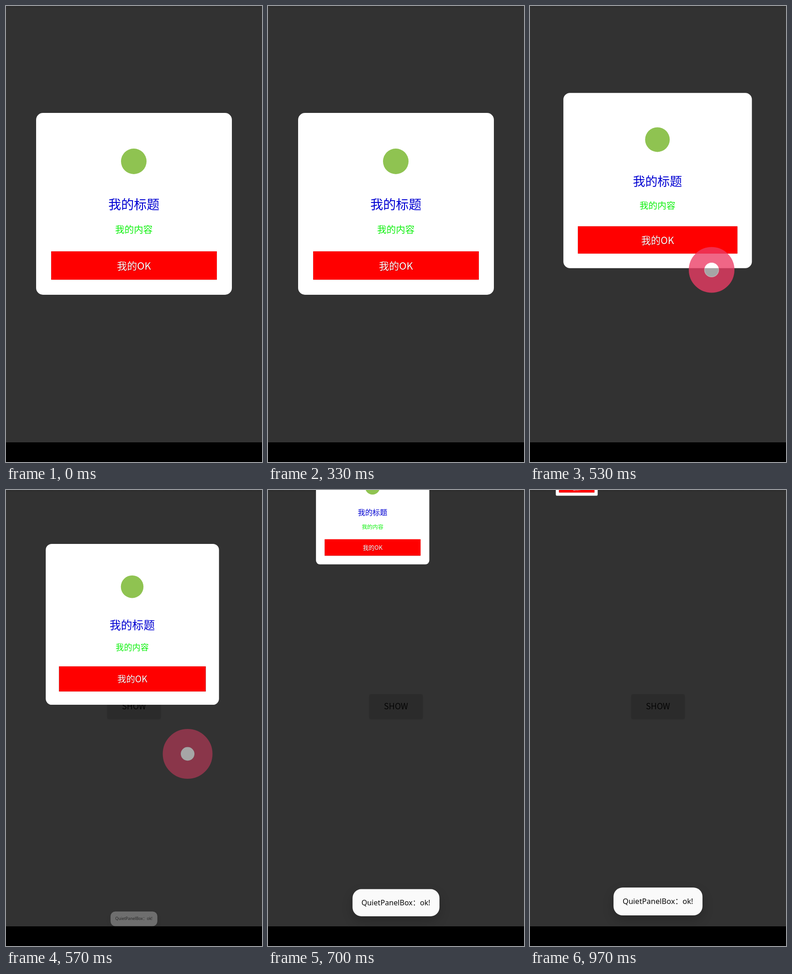
Recreate the animation shown at these times as an HTML page. Size 561 by 998 pixels, loop 1.01 s.

```html
<!DOCTYPE html>
<html lang="zh">
<head>
<meta charset="utf-8">
<title>Dialog dismiss</title>
<style>
  html, body { margin: 0; width: 100%; height: 100%; overflow: hidden; background: #323232; }
  #stage {
    position: relative; width: 561px; height: 998px; overflow: hidden;
    background: linear-gradient(#2c2c2c, #323232 5px);
    font-family: "Noto Sans CJK SC", "Noto Sans CJK", "Noto Sans", sans-serif;
  }
  #stage div, svg { position: absolute; }
  .label { left: 0; right: 0; text-align: center; white-space: nowrap; }

  #show {
    left: 222px; top: 447px; width: 117px; height: 54px; border-radius: 4px;
    background: #2b2b2b; box-shadow: 0 1px 2px #2d2d2d;
    color: #050505; font-size: 18px; line-height: 51px; text-align: center;
  }

  #dialog {
    left: 65.5px; top: 234px; width: 429.3px; height: 398px;
    border-radius: 15px; background: #fff;
  }
  #icon { left: 186.5px; top: 78px; width: 56px; height: 56px; border-radius: 50%; background: #8fc351; }
  #title { top: 179px; font-size: 28px; line-height: 40px; font-weight: 500; color: #0000d2; }
  #content { top: 239px; font-size: 20.5px; line-height: 30px; font-weight: 500; color: #0ef00e; }
  #ok {
    left: 33.5px; top: 303px; width: 363px; height: 62px; background: #f00;
    box-shadow: 0 0 1px #888;
    color: #fff; font-size: 22px; line-height: 60px; font-weight: 500; text-align: center;
    text-shadow: 1px 1px 1px rgba(90, 0, 0, .5);
  }

  #toast {
    left: 183px; top: 870px; width: 194.5px; height: 61px; border-radius: 20px;
    background: #fafafa; box-shadow: 0 10px 24px rgba(0, 0, 0, .2);
    color: #0a0a0a; font: 16.5px/60px "Noto Sans", "Noto Sans CJK SC", sans-serif;
    text-align: center; white-space: nowrap;
  }
  #nav { left: 0; top: 955px; width: 561px; height: 43px; background: #000; }
  svg { left: 0; top: 0; }
</style>
</head>
<body>
<div id="stage">
  <div id="show">SHOW</div>
  <div id="dialog">
    <div id="icon"></div>
    <div id="title" class="label">我的标题</div>
    <div id="content" class="label">我的内容</div>
    <div id="ok">我的OK</div>
  </div>
  <svg width="561" height="998">
    <circle id="ring" cx="398" cy="577.5" fill="none" stroke="#ec3b64"/>
    <circle id="dot" cx="398" cy="577.5" fill="#fff" stroke="#fff" stroke-width="1.5"/>
  </svg>
  <div id="toast">QuietPanelBox：ok!</div>
  <div id="nav"></div>
</div>
<script>
  const LOOP = 1010, STEP = 100 / 3, LAST = 29;
  const el = id => document.getElementById(id);
  const [dialog, toast, ring, dot] = ['dialog', 'toast', 'ring', 'dot'].map(el);

  // Monotone cubic curve through [step, value] points, flat outside them.
  function curve(...pts) {
    const end = pts.length - 1;
    const slope = i => (pts[i + 1][1] - pts[i][1]) / (pts[i + 1][0] - pts[i][0]);
    const tangent = i => {
      if (i === 0) return 0;
      if (i === end) return slope(end - 1);
      const a = slope(i - 1), b = slope(i);
      return a * b > 0 ? 2 * a * b / (a + b) : 0;
    };
    return x => {
      if (x <= pts[0][0]) return pts[0][1];
      if (x >= pts[end][0]) return pts[end][1];
      const i = pts.findIndex(p => p[0] > x) - 1;
      const [x0, y0] = pts[i], [x1, y1] = pts[i + 1];
      const w = x1 - x0, u = (x - x0) / w, v = 1 - u;
      return v * v * (1 + 2 * u) * y0 + u * u * (3 - 2 * u) * y1
        + w * u * v * (v * tangent(i) - u * tangent(i + 1));
    };
  }

  const card = {
    x: curve([15, 0], [16, -.8], [17, -3.6], [19, -24.3], [24, -97], [29, -178.2]),
    y: curve([14, 0], [15, -12], [16, -51], [17, -139], [19, -304.5], [24, -451.5], [29, -463]),
    scale: curve([14, 1], [15, .993], [16, .963], [17, .885], [19, .708], [24, .419], [29, .214])
  };
  const note = {
    y: curve([17, 38], [19, 10.5], [24, -2.5], [29, 0]),
    scale: curve([17, .526], [19, .91], [24, 1.02], [29, 1]),
    alpha: curve([16, 0], [17, .3], [19, .985], [21, 1])
  };
  const touch = {
    outer: curve([12, 20], [14, 32], [16, 50], [17, 54.5], [19, 52], [20, 51]),
    inner: curve([14, 16.5], [17, 15]),
    ringAlpha: curve([11, 0], [12, .5], [14, .81], [16, .78], [17, .47], [19, .14], [20, 0]),
    dotAlpha: curve([11, 0], [12, .4], [14, .5], [17, .57], [19, .26], [20, 0]),
    edge: curve([11, 0], [13, .85], [14, .85], [17, 0])
  };

  const place = (node, x, y, s) => {
    node.style.transform = `translate(${x}px, ${y}px) scale(${s})`;
  };

  function draw(ms) {
    // Steps fall on 10 ms ticks, 30 of them per second.
    const n = Math.min(LAST, Math.floor((Math.floor(ms / 10) * 10 + 5) / STEP));

    place(dialog, card.x(n), card.y(n), card.scale(n));
    place(toast, 0, note.y(n), note.scale(n));
    toast.style.opacity = note.alpha(n);

    const outer = touch.outer(n), inner = touch.inner(n);
    ring.setAttribute('r', (outer + inner) / 2);
    ring.setAttribute('stroke-width', outer - inner);
    ring.setAttribute('stroke-opacity', touch.ringAlpha(n));
    dot.setAttribute('r', inner);
    dot.setAttribute('fill-opacity', touch.dotAlpha(n));
    dot.setAttribute('stroke-opacity', touch.edge(n));
  }

  const start = performance.now();
  function tick() {
    draw((performance.now() - start) % LOOP);
    requestAnimationFrame(tick);
  }
  draw(0);
  requestAnimationFrame(tick);
</script>
</body>
</html>
```
